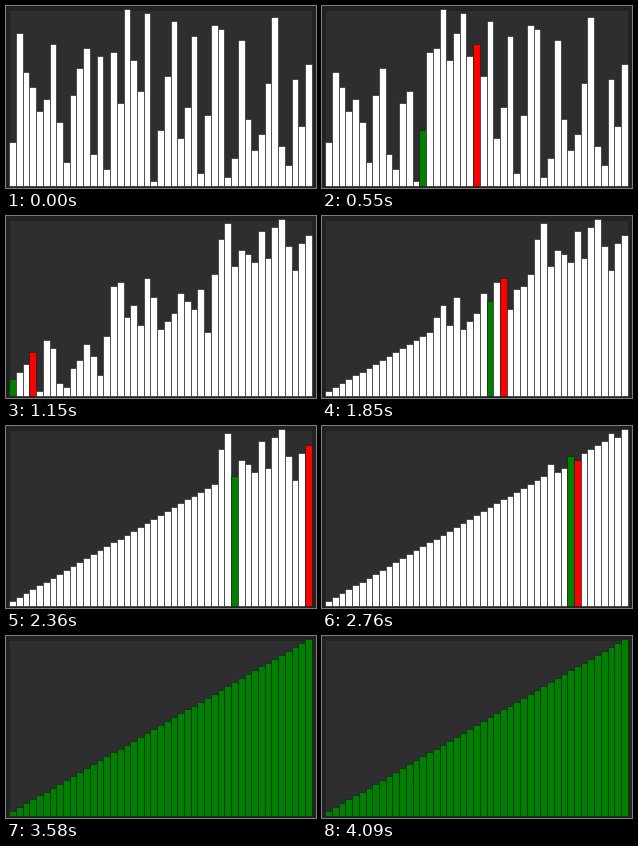
A matplotlib script that plays this animation: 310 by 182 pixels, repeating every 4180 ms.

```python
import numpy as np
import matplotlib.pyplot as plt
from matplotlib.animation import FuncAnimation
from matplotlib.collections import PolyCollection
from matplotlib.patches import Rectangle

W, H, DPI = 310, 182, 100
TICK = 10  # ms
LEFT, PITCH = 3.2, 6.725
TOP, STEP, BASE = 3.1, 3.909, 180.0
EDGE = 0.6  # px
WHITE, GREEN, RED = "white", "green", "red"

START = [11, 39, 29, 25, 19, 22, 36, 16, 6, 23, 30, 35, 8, 33, 4,
         34, 21, 45, 32, 24, 44, 1, 14, 28, 42, 12, 20, 38, 3, 18,
         41, 40, 2, 7, 37, 17, 9, 13, 26, 43, 10, 5, 27, 15, 31]
N = len(START)


def quicksort(a, low, high):
    """Yield the two highlighted positions at every compare and swap."""
    if low >= high:
        return
    i = low
    for j in range(low, high):
        yield j, high
        if a[j] < a[high]:
            a[i], a[j] = a[j], a[i]
            yield i, j
            i += 1
    a[i], a[high] = a[high], a[i]
    yield i, high
    yield from quicksort(a, low, i - 1)
    yield from quicksort(a, i + 1, high)


def record():
    """List every (values, colours) state, ending with the green sweep."""
    a = list(START)
    states = [(list(a), [WHITE] * N)]
    for first, second in quicksort(a, 0, N - 1):
        colors = [WHITE] * N
        colors[first] = GREEN
        colors[second] = RED
        states.append((list(a), colors))
    for done in range(1, N + 1):
        states.append((list(a), [GREEN] * done + [WHITE] * (N - done)))
    return states


def bar(i, value):
    x0, x1 = LEFT + i * PITCH, LEFT + (i + 1) * PITCH
    y = TOP + STEP * (N - value)
    return [(x0, BASE), (x0, y), (x1, y), (x1, BASE)]


states = record()

# Screen refreshes: a long hold, then 30 ms each with an extra tick every 33rd.
holds = [30] + [4 if k % 33 == 8 else 3 for k in range(1, 126)] + [9]
refresh = np.repeat(np.arange(len(holds)), holds)

# Sorting steps reached at a few refreshes; the pace is nearly constant.
last = len(states) - 1
pace_x = [0, 9, 29, 52, 82, 82 + (last - 353) / 4.3]
pace_y = [0, 38, 124, 225, 353, last]
steps = np.rint(np.interp(refresh, pace_x, pace_y)).astype(int)

fig = plt.figure(figsize=(W / DPI, H / DPI), dpi=DPI, facecolor="#222222")
ax = fig.add_axes([0, 0, 1, 1])
ax.set_xlim(0, W)
ax.set_ylim(H, 0)
ax.axis("off")
ax.add_patch(Rectangle((4, 5), 302, 175, facecolor="#2e2e30", linewidth=0))

bars = PolyCollection([bar(i, v) for i, v in enumerate(START)],
                      facecolors=WHITE, edgecolors="#1c1c1c",
                      linewidths=EDGE * 72 / DPI)
ax.add_collection(bars, autolim=False)


def update(tick):
    values, colors = states[steps[tick]]
    bars.set_verts([bar(i, v) for i, v in enumerate(values)])
    bars.set_facecolor(colors)
    return [bars]


anim = FuncAnimation(fig, update, frames=len(steps), interval=TICK,
                     repeat=True, repeat_delay=0)
plt.show()
```
